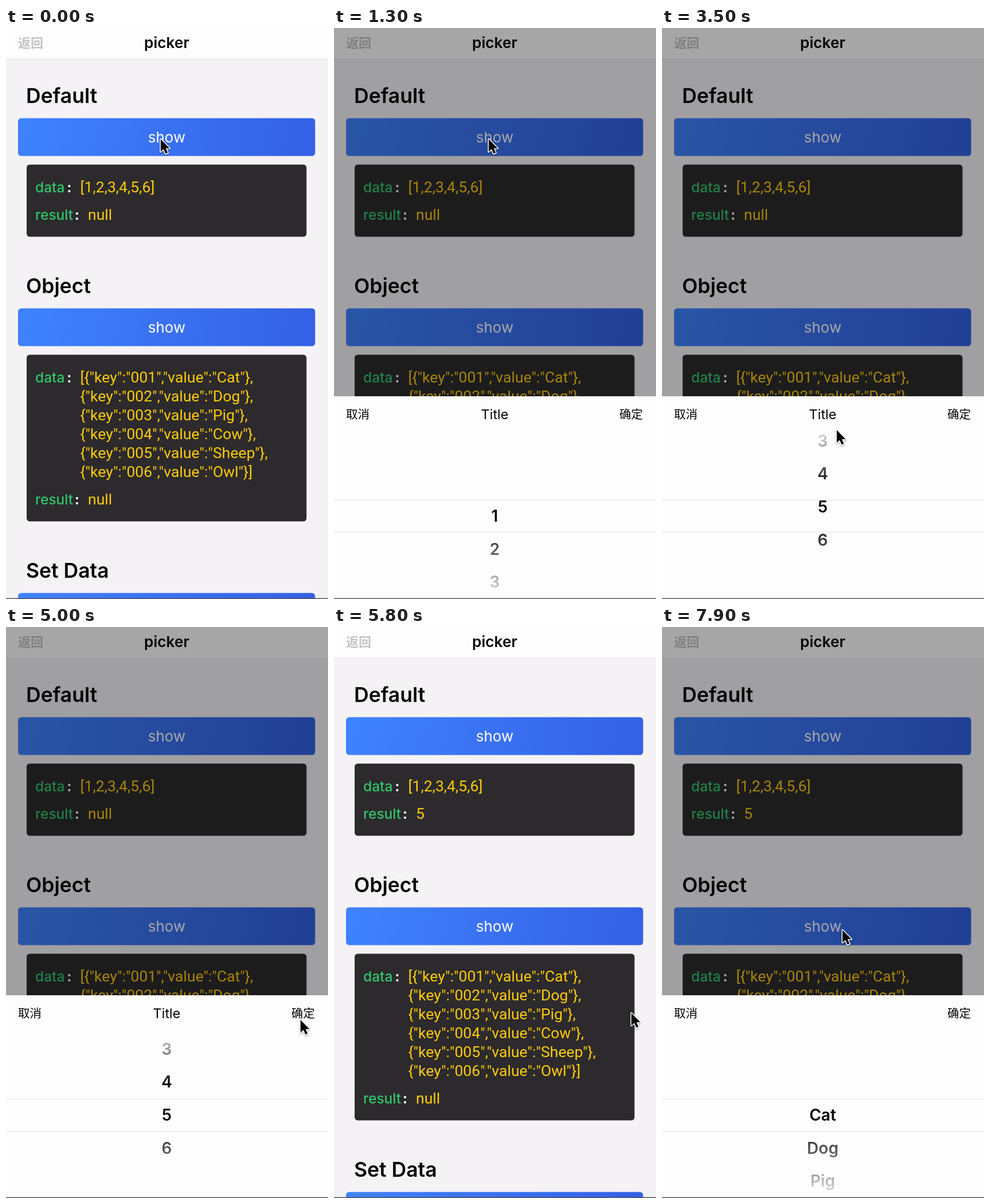
An HTML page with a canvas for the animation above (8000 ms loop, 562 by 997 pixels).

```html
<!DOCTYPE html>
<html lang="en">
<head>
<meta charset="utf-8">
<title>picker</title>
<style>
html, body { margin: 0; width: 100%; height: 100%; overflow: hidden; background: #f4f2f5; }
canvas { display: block; width: 562px; height: 997px; }
</style>
</head>
<body>
<canvas id="stage" width="562" height="997"></canvas>
<script>
const W = 562, H = 997, MID = 280.5, LOOP = 8000, STEP = 100;
const ctx = document.getElementById('stage').getContext('2d');

const UI = 'Inter, "Noto Sans CJK SC", sans-serif';
const CODE = 'Roboto, sans-serif';
const HAN = '"Noto Sans CJK SC", "Noto Sans CJK", sans-serif';
const INK = '#050505', GREEN = '#30c56c', YELLOW = '#fdcb0a';

const SHEET_TOP = 643, ROW = 57.6, LINE = 33;
const NUMBERS = ['1', '2', '3', '4', '5', '6'];
const ANIMALS = ['Cat', 'Dog', 'Pig', 'Cow', 'Sheep', 'Owl'];
const ARROW = new Path2D('M1 1V23L6 18.4L9.6 26.6L13.4 25L9.9 17H16.6Z');

// Eased progress from 0 to 1 between two times.
function ramp(t, from, to) {
  const p = Math.min(1, Math.max(0, (t - from) / (to - from)));
  return p * p * (3 - 2 * p);
}

function pointerAt(t) {
  const at = { x: 269, y: 193 };
  const go = (from, to, x, y) => {
    const p = ramp(t, from, to);
    at.x += (x - at.x) * p;
    at.y += (y - at.y) * p;
  };
  go(1800, 2200, 302, 947);
  go(2200, 2900, 304, 701);  // drag the wheel up
  go(3800, 4500, 330, 738);
  go(4500, 5000, 513, 685);  // confirm
  go(5400, 5700, 518, 673);
  go(6400, 7000, 314, 528);  // second button
  return at;
}

// The wheel follows the drag past a row, then snaps back to it.
function scrollAt(t) {
  const over = 16;
  return (4 * ROW + over) * ramp(t, 2200, 2900) - over * ramp(t, 3700, 4000);
}

function openAt(t) {
  return ramp(t, 700, 1100) - ramp(t, 5400, 5700) + ramp(t, 7300, 7700);
}

function text(str, x, y, size, color = INK, { weight = 400, align = 'left', family = UI } = {}) {
  ctx.font = `${weight} ${size}px ${family}`;
  ctx.textAlign = align;
  ctx.fillStyle = color;
  ctx.fillText(str, x, y);
}

function rect(x, y, w, h, fill) {
  ctx.fillStyle = fill;
  ctx.fillRect(x, y, w, h);
}

function panel(x, y, w, h, fill) {
  ctx.beginPath();
  ctx.roundRect(x, y, w, h, 5.5);
  ctx.fillStyle = fill;
  ctx.fill();
}

function heading(title, y) {
  text(title, 35, y + 131, 35.5, INK, { weight: 600 });
  const g = ctx.createLinearGradient(21, y, 539, y + 66);
  g.addColorStop(0, '#4084ff');
  g.addColorStop(1, '#3461e5');
  panel(21, y + 157.5, 518.5, 66, g);
  text('show', MID, y + 199.5, 26, '#fff', { align: 'center' });
}

function field(name, colonX, y, lines) {
  text(name, 51, y, 24.5, GREEN, { weight: 500 });
  text(':', colonX, y, 25, '#fff', { weight: 700, align: 'center' });
  lines.forEach((s, i) => text(s, colonX + 19, y + LINE * i, 26.6, YELLOW, { family: CODE }));
}

// Draws one block and returns the top of the next.
function section(title, y, data, result) {
  const extra = LINE * (data.length - 1);
  heading(title, y);
  panel(36, y + 238.5, 488.5, 126 + extra, '#2c2a2c');
  field('data', 110.5, y + 287, data);
  field('result', 124, y + 335 + extra, [result]);
  return y + 332 + extra;
}

function page(result) {
  rect(0, 0, W, H, '#f4f2f5');
  rect(0, 0, W, 54, '#fefdfe');
  rect(0, 54, W, 1, '#e4e3e6');
  text('返回', 21, 33.5, 22, '#c4c3c5', { weight: 700, family: HAN });
  text('picker', MID, 35, 26.3, INK, { weight: 600, align: 'center' });

  const rows = ANIMALS.map((value, i) => JSON.stringify({ key: `00${i + 1}`, value }));
  const objects = `[${rows.join(',\n')}]`.split('\n');
  let y = section('Default', 0, ['[1,2,3,4,5,6]'], result);
  y = section('Object', y, objects, 'null');
  heading('Set Data', y);
}

function fade(y0, y1, a0, a1) {
  const g = ctx.createLinearGradient(0, y0, 0, y1);
  g.addColorStop(0, `rgba(254,253,254,${a0})`);
  g.addColorStop(1, `rgba(254,253,254,${a1})`);
  rect(0, y0, W, y1 - y0, g);
}

function wheel(items, scroll) {
  ctx.save();
  ctx.beginPath();
  ctx.rect(0, 700, W, H - 700);
  ctx.clip();
  items.forEach((s, i) =>
    text(s, MID, 862 + ROW * i - scroll, 28, INK, { weight: 600, align: 'center' }));
  fade(700, 800, 0.93, 0);
  fade(881, H, 0.12, 0.93);
  ctx.restore();
  for (const y of [824, 880]) rect(0, y, W, 1, '#e3e3e6');
}

function sheet(items, title, scroll, open) {
  ctx.save();
  ctx.translate(0, (H - SHEET_TOP) * (1 - open));
  rect(0, SHEET_TOP, W, H - SHEET_TOP, '#fefdfe');
  wheel(items, scroll);
  text('取消', 21, 682, 20.5, INK, { family: HAN });
  text('确定', 539, 682, 20.5, INK, { align: 'right', family: HAN });
  text(title, MID, 683, 23.5, INK, { align: 'center' });
  ctx.restore();
}

function pointer({ x, y }) {
  ctx.save();
  ctx.translate(x, y);
  ctx.lineJoin = 'round';
  ctx.lineWidth = 3;
  ctx.shadowColor = 'rgba(0,0,0,.35)';
  ctx.shadowBlur = 3;
  ctx.shadowOffsetY = 1.5;
  ctx.strokeStyle = '#fff';
  ctx.stroke(ARROW);
  ctx.shadowColor = 'transparent';
  ctx.fillStyle = INK;
  ctx.fill(ARROW);
  ctx.restore();
}

function draw(t) {
  const open = openAt(t);
  page(t >= 5400 ? '5' : 'null');
  if (open > 0) {
    rect(0, 0, W, H, `rgba(0,0,0,${0.345 * open})`);
    if (t < 6000) sheet(NUMBERS, 'Title', scrollAt(t), open);
    else sheet(ANIMALS, '', 0, open);
  }
  rect(0, 995.5, W, 1.5, '#565558');
  pointer(pointerAt(t));
}

const start = performance.now();
function tick() {
  const t = (performance.now() - start) % LOOP;
  draw(Math.floor(t / STEP) * STEP);
  requestAnimationFrame(tick);
}
tick();
</script>
</body>
</html>
```
